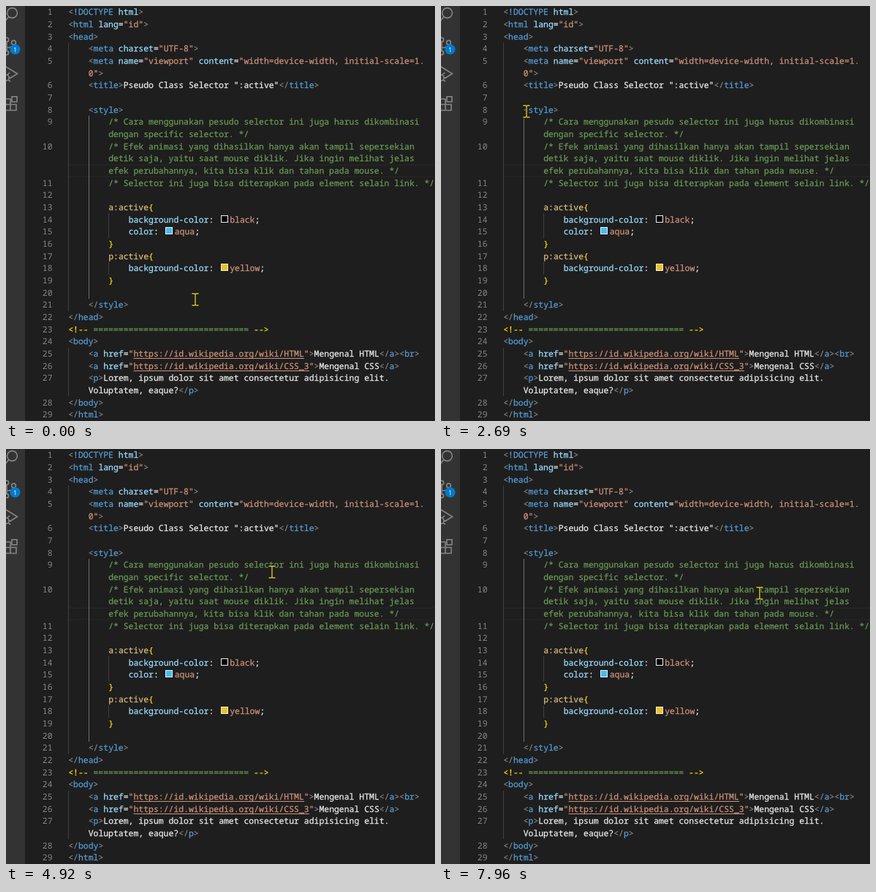
These frames come from a looping animation (587 by 567 pixels, 8 s). An HTML page:

```html
<!DOCTYPE html>
<html lang="id">
<head>
<meta charset="UTF-8">
<title>Code editor</title>
<style>
  html, body { margin: 0; width: 100%; height: 100%; overflow: hidden; background: #1e1e1e; }
  svg { display: block; width: 587px; height: 567px; }
  text { font: 11.45px "Noto Sans Mono", "DejaVu Sans Mono", monospace; white-space: pre; text-rendering: geometricPrecision; }
  #code { stroke-width: .25; }
  .icon { fill: none; stroke: #858585; stroke-width: 1.6; }
</style>
</head>
<body>
<svg id="stage" viewBox="0 0 587 567" xmlns="http://www.w3.org/2000/svg">
  <rect width="587" height="567" fill="#1e1e1e"/>
  <rect width="26" height="567" fill="#333"/>
  <g class="icon">
    <circle cx="8.5" cy="9.5" r="6.9"/>
    <path d="M4 14.5L-2 21.5"/>
    <circle cx="1" cy="46" r="2.7"/>
    <circle cx="10.5" cy="50" r="2.9"/>
    <path d="M1 49V62M10 53Q9 57 1 57"/>
    <circle cx="1" cy="64" r="2.6"/>
    <path d="M0 83L15.5 92.5L5 99"/>
    <circle cx="0" cy="98" r="4"/>
    <path d="M2 94L5 91M4 98H7M3 101L6 103"/>
    <rect x="8" y="123.8" width="7" height="7"/>
    <path d="M0 127H6V142.5H0M0 134.5H14V142.5H0"/>
  </g>
  <circle cx="12.5" cy="59.2" r="7" fill="#007acc"/>
  <text x="12.5" y="62.5" text-anchor="middle" fill="#fff" style="font:9px 'Open Sans',sans-serif">1</text>
  <path d="M85 217.2H587M85 233.2H587" stroke="#282828"/>
  <g id="code"></g>
  <g id="pointer" fill="none"></g>
</svg>
<script>
const NS = 'http://www.w3.org/2000/svg';
const LEFT = 85.2, CHAR = 6.87, ROW = 50 / 3;
const code = document.getElementById('code');
const pointer = document.getElementById('pointer');

function add(parent, tag, attrs, text) {
  const el = document.createElementNS(NS, tag);
  for (const key in attrs) el.setAttribute(key, attrs[key]);
  if (text !== undefined) el.textContent = text;
  return parent.appendChild(el);
}

// ^ and a letter switch the colour: gray, tag, attribute, string, url, comment, white, selector, bracket, value
const colors = {
  g: '#808080', t: '#569cd6', a: '#9cdcfe', s: '#ce9178', u: '#ce9178',
  c: '#6a9955', w: '#ececec', p: '#d7ba7d', b: '#ffd700', v: '#ce9178'
};
const swatches = { black: '#000', aqua: '#45bdf0', yellow: '#e8c41c' };

const open = name => `^g<^t${name}^g>`;
const close = name => `^g</^t${name}^g>`;
const link = (url, label) =>
  `^g<^ta ^ahref^w=^s"^u${url}^s"^g>^w${label}${close('a')}`;

// Leading spaces indent a row; ~ marks a wrapped continuation.
const rows = `^g<^t!DOCTYPE ^ahtml^g>
^g<^thtml ^alang^w=^s"id"^g>
${open('head')}
    ^g<^tmeta ^acharset^w=^s"UTF-8"^g>
    ^g<^tmeta ^aname^w=^s"viewport" ^acontent^w=^s"width=device-width, initial-scale=1.
~    ^s0"^g>
    ${open('title')}^wPseudo Class Selector ":active"${close('title')}

    ${open('style')}
        ^c/* Cara menggunakan pesudo selector ini juga harus dikombinasi
~        ^cdengan specific selector. */
        ^c/* Efek animasi yang dihasilkan hanya akan tampil sepersekian
~        ^cdetik saja, yaitu saat mouse diklik. Jika ingin melihat jelas
~        ^cefek perubahannya, kita bisa klik dan tahan pada mouse. */
        ^c/* Selector ini juga bisa diterapkan pada element selain link. */

        ^pa:active^b{
            ^abackground-color^w: ^vblack^w;
            ^acolor^w: ^vaqua^w;
        ^b}
        ^pp:active^b{
            ^abackground-color^w: ^vyellow^w;
        ^b}

    ${close('style')}
${close('head')}
^b<!-- ^c${'='.repeat(31)}^b -->
${open('body')}
    ${link('https://id.wikipedia.org/wiki/HTML', 'Mengenal HTML')}${open('br')}
    ${link('https://id.wikipedia.org/wiki/CSS_3', 'Mengenal CSS')}
    ${open('p')}^wLorem, ipsum dolor sit amet consectetur adipisicing elit.
~    ^wVoluptatem, eaque?${close('p')}
${close('body')}
${close('html')}`.split('\n');

function drawGuides(indent, row) {
  const top = Math.round(row * ROW), height = Math.round((row + 1) * ROW) - top;
  for (let column = 0; column < indent; column += 4) {
    add(code, 'rect', {
      x: Math.round(LEFT + column * CHAR), y: top, width: 1, height,
      fill: column === 4 ? '#707070' : '#404040'
    });
  }
}

function drawToken(line, kind, text, column, y) {
  const fill = colors[kind], x = LEFT + column * CHAR;
  const span = add(line, 'tspan', { fill, stroke: fill }, text);
  if (kind === 'u') {
    add(code, 'rect', { x, y: Math.round(y + 2), width: text.length * CHAR, height: 1, fill });
  }
  if (kind === 'v') {
    span.setAttribute('dx', 15);
    add(code, 'rect', {
      x: Math.round(x + 2.5) + .5, y: Math.floor(y - 9.5) + .5,
      width: 9, height: 9, fill: swatches[text], stroke: '#eee', 'stroke-width': 1
    });
  }
}

let number = 0, indent = 0;
rows.forEach((row, i) => {
  const [, wrapped, spaces, markup] = row.match(/^(~?)( *)(.*)$/);
  const y = 12.2 + i * ROW;
  if (markup) indent = spaces.length;
  drawGuides(indent, i);
  if (!wrapped) add(code, 'text', { x: 63.6, y, 'text-anchor': 'end', fill: '#858585' }, ++number);
  const line = add(code, 'text', { x: LEFT + indent * CHAR, y });
  let column = indent;
  for (const part of markup.split('^').slice(1)) {
    const text = part.slice(1);
    drawToken(line, part[0], text, column, y);
    column += text.length;
  }
});

const serif = y => `M-4.5 ${y}H-1.5Q0 ${y} 0 ${y * .8}Q0 ${y} 1.5 ${y}H4.5`;
const beam = serif(-8) + serif(8) + 'M0 -6.5V6.5';
add(pointer, 'path', { d: beam, stroke: '#17170f', 'stroke-width': 2.8 });
add(pointer, 'path', { d: beam, stroke: '#dcc632', 'stroke-width': 1.4 });

// Turning points of the pointer: time, x, y
const turns = [
  [180, 259, 401], [390, 150, 452], [800, 88, 33], [1060, 88, 33], [1200, 188, 16],
  [1340, 97, 24], [1640, 150, 80], [2000, 198, 60], [2480, 140, 167], [2670, 117, 144],
  [3530, 185, 158], [4140, 267, 158], [4910, 364, 168], [5200, 373, 167], [6170, 157, 206],
  [6480, 131, 192], [6870, 258, 197], [7130, 258, 197], [7920, 436, 197]
];

function positionAt(t) {
  const next = turns.findIndex(turn => turn[0] > t);
  if (next < 1) return turns.at(next).slice(1);
  const [t0, ...from] = turns[next - 1], [t1, ...to] = turns[next];
  return from.map((v, axis) => Math.round(v + (to[axis] - v) * (t - t0) / (t1 - t0)));
}

// The pointer is redrawn once every 70 ms, counted from the end of each rest.
function draw(t) {
  const start = t < 1060 ? 250 : 1060;
  const tick = start + Math.floor((t - start) / 70) * 70;
  pointer.setAttribute('transform', `translate(${positionAt(tick)})`);
}

const begin = performance.now();
function loop() {
  draw((performance.now() - begin) % 8000);
  requestAnimationFrame(loop);
}
draw(0);
requestAnimationFrame(loop);
</script>
</body>
</html>
```
